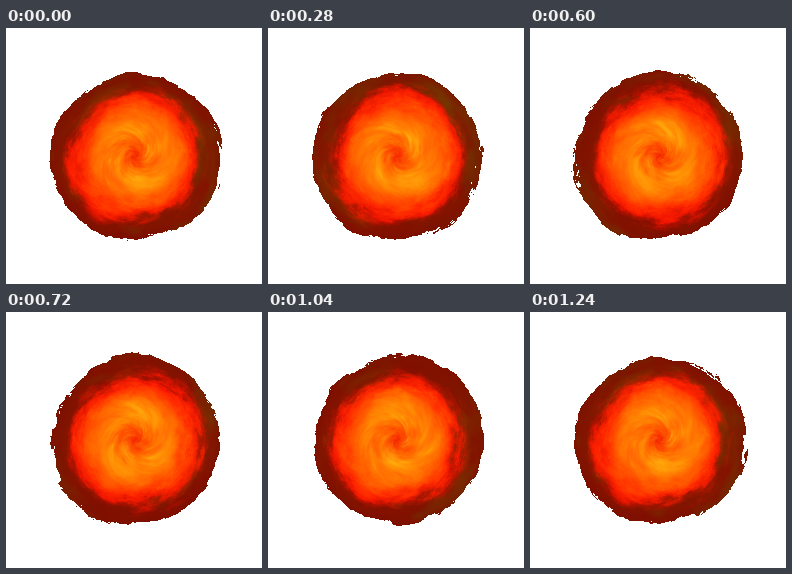
These frames come from a looping animation (256 px wide and 256 px high, 1.28 s). An HTML page with a canvas:

```html
<!DOCTYPE html>
<html>
<head>
<meta charset="utf-8">
<style>
  html, body { margin: 0; height: 100%; overflow: hidden; background: #fff; }
  canvas { display: block; width: 100vw; height: 100vh; }
</style>
</head>
<body>
<canvas id="stage" width="256" height="256"></canvas>
<script>
const SIZE = 256, CX = 128.5, CY = 127.5, LOOP = 1280, STEP = 40;
const ctx = document.getElementById('stage').getContext('2d');
const image = ctx.createImageData(SIZE, SIZE);

// Heat by radius: [radius, red, green, blue]
const STOPS = [
  [0, 246, 40, 0], [6, 252, 74, 0], [14, 255, 112, 0], [25, 255, 142, 4],
  [35, 255, 130, 2], [46, 255, 92, 0], [56, 255, 46, 0], [62, 238, 26, 0],
  [67, 168, 20, 0], [72, 132, 20, 0], [90, 122, 17, 0]
];
const ramp = Array.from({ length: 121 }, (_, r) => {
  const i = STOPS.findIndex(s => s[0] >= r);
  if (i < 0) return STOPS[STOPS.length - 1].slice(1);
  if (i === 0) return STOPS[0].slice(1);
  const a = STOPS[i - 1], b = STOPS[i], k = (r - a[0]) / (b[0] - a[0]);
  return [1, 2, 3].map(c => a[c] + (b[c] - a[c]) * k);
});

let seed = 71;
const lattice = Float32Array.from({ length: 65536 }, () => {
  seed = (Math.imul(seed, 1664525) + 1013904223) >>> 0;
  return seed / 2147483648 - 1;
});

const smooth = x => x * x * (3 - 2 * x);
const wrap = (n, period) => ((n % period) + period) % period;

// Value noise that repeats every pu by pv cells
function noise(u, v, pu, pv, layer) {
  const iu = Math.floor(u), iv = Math.floor(v);
  const fu = smooth(u - iu), fv = smooth(v - iv);
  const u0 = wrap(iu, pu), u1 = (u0 + 1) % pu;
  const v0 = wrap(iv, pv), v1 = (v0 + 1) % pv;
  const at = (x, y) => lattice[(x + y * 257 + layer * 7919) & 65535];
  const top = at(u0, v0) + (at(u1, v0) - at(u0, v0)) * fu;
  const low = at(u0, v1) + (at(u1, v1) - at(u0, v1)) * fu;
  return top + (low - top) * fv;
}

function fractal(u, v, pu, pv, octaves, gain, layer) {
  let sum = 0, amp = 1;
  for (let o = 0; o < octaves; o++) {
    const k = 1 << o;
    sum += amp * noise(u * pu * k, v * pv * k, pu * k, pv * k, layer + o);
    amp *= gain;
  }
  return sum;
}

// Polar coordinates of every pixel the fire can reach
const cells = [];
for (let y = 0; y < SIZE; y++) {
  for (let x = 0; x < SIZE; x++) {
    const r = Math.hypot(x - CX, y - CY);
    if (r < 90) {
      const depth = Math.log(r + 4);
      const turn = Math.atan2(y - CY, x - CX) / (2 * Math.PI);
      cells.push({ at: (y * SIZE + x) * 4, r, depth, turn, swirl: turn + depth * 0.26 });
    }
  }
}

function draw(t) {
  const px = image.data;
  px.fill(255);
  for (const { at, r, depth, turn, swirl } of cells) {
    const crust = fractal(turn, r / 50 - t, 9, 3, 6, 0.7, 40);
    if (r + crust * 3.6 > 84.6) continue;

    const wisp = fractal(swirl, depth * 0.7 - t, 8, 2, 4, 0.65, 20);
    const reach = Math.min(1, r / 55);
    const heat = Math.max(0, r + crust * 5.5 * reach * reach + wisp * 2);
    const [red, green, blue] = ramp[Math.round(heat)];
    const glow = 1 + wisp * 0.2 * Math.min(1, r / 10);
    const ash = Math.max(0, fractal(turn, r / 60 - t, 6, 2, 4, 0.6, 60));
    const cool = Math.min(1, Math.max(0, (heat - 60) / 10));
    px[at] = red - 10 * ash * cool;
    px[at + 1] = green * glow + 22 * ash * cool;
    px[at + 2] = blue + Math.max(0, wisp) * 14 * Math.max(0, 1 - r / 50);
  }
  ctx.putImageData(image, 0, 0);
}

let shown = -1;
function tick() {
  const step = Math.floor((performance.now() % LOOP) / STEP);
  if (step !== shown) {
    shown = step;
    draw(step * STEP / LOOP);
  }
  requestAnimationFrame(tick);
}
tick();
</script>
</body>
</html>
```
